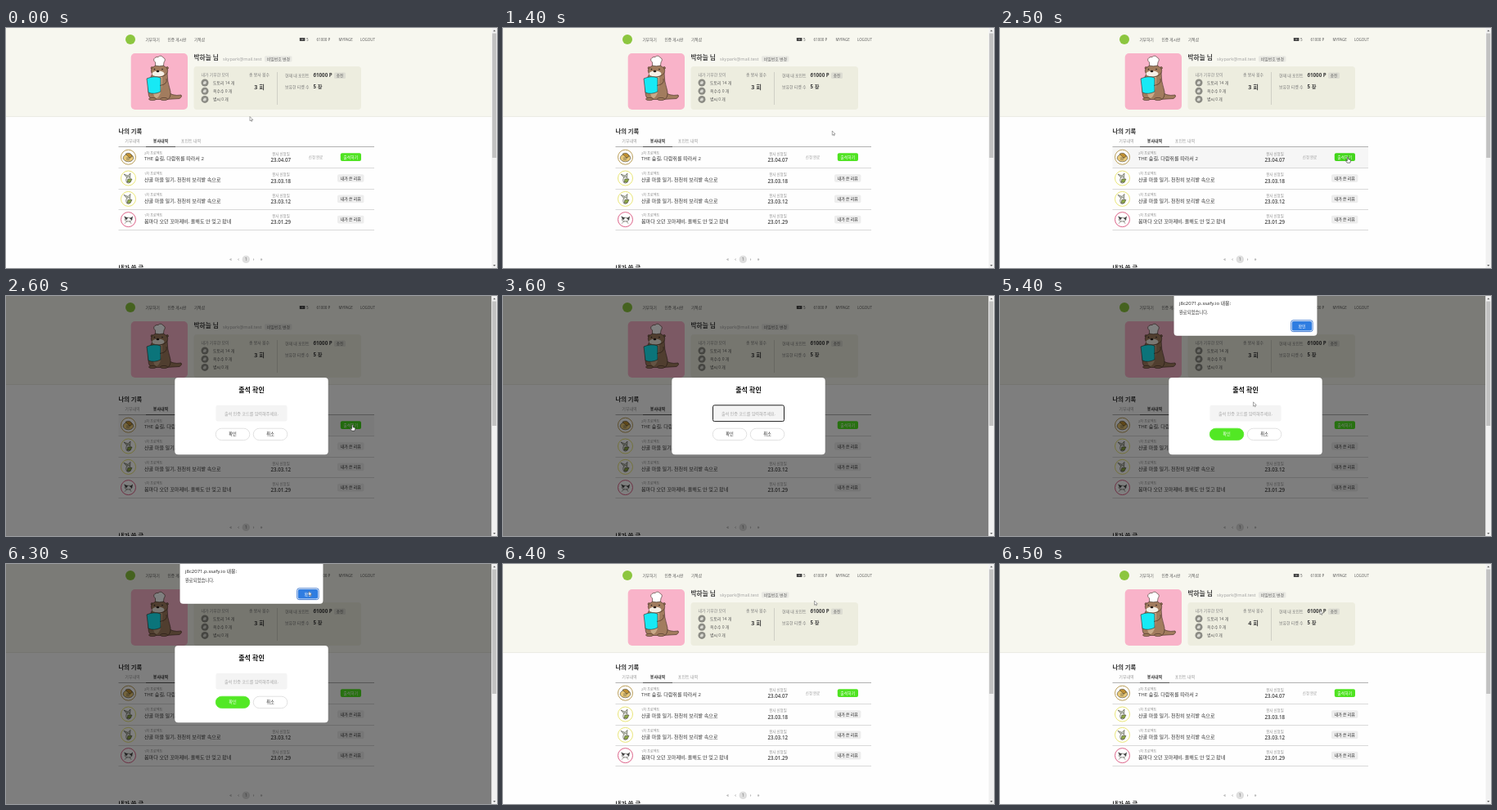
Animation of 600 by 294 pixels, one loop 6.6 s. Source, as an HTML page:

```html
<!DOCTYPE html>
<html>
<head>
<meta charset="utf-8">
<style>
html, body { margin: 0; width: 100%; height: 100%; overflow: hidden; background: #fefefe; }
svg { display: block; width: 600px; height: 294px; }
text { font-family: 'Open Sans', 'Noto Sans CJK KR', 'Noto Sans CJK', sans-serif; white-space: pre; }
</style>
</head>
<body>
<svg id="stage" viewBox="0 0 600 294" xmlns="http://www.w3.org/2000/svg">
  <g id="page"></g>
  <g id="modal">
    <rect width="593.5" height="294" fill="#000" opacity=".5"/>
  </g>
  <g id="alert"></g>
  <g id="scrollbar"></g>
  <g id="pointer">
    <path id="arrow" d="M0 0V5.3L1.2 4.3L2 6L2.8 5.6L2.1 4H3.8Z" fill="#fff" stroke="#555" stroke-width=".5"/>
    <path id="hand" d="M-.7 .6Q0 -.5 .7 .6V3L3 3.5Q3.7 3.8 3.5 5L2.8 7.3H-.8L-2.6 4.9Q-2.5 3.8 -.7 5Z" fill="#fff" stroke="#222" stroke-width=".6"/>
    <path id="beam" d="M-1 -1H1M0 -1V5M-1 5H1" fill="none" stroke="#333" stroke-width=".6"/>
  </g>
</svg>
<script>
const $ = id => document.getElementById(id);
let layer = $('page');

function add(tag, attrs, content) {
  const el = document.createElementNS('http://www.w3.org/2000/svg', tag);
  for (const key in attrs) el.setAttribute(key, attrs[key]);
  if (content !== undefined) el.textContent = content;
  return layer.appendChild(el);
}
const text = (s, x, y, size, fill = '#555', weight = 400, anchor = 'start') =>
  add('text', { x, y, 'font-size': size, fill, 'font-weight': weight, 'text-anchor': anchor }, s);
const mid = (s, x, y, size, fill, weight) => text(s, x, y, size, fill, weight, 'middle');
const box = (x, y, width, height, fill, rx = 0, more = {}) =>
  add('rect', { x, y, width, height, fill, rx, ...more });
const dot = (cx, cy, r, fill, more = {}) => add('circle', { cx, cy, r, fill, ...more });
const oval = (cx, cy, rx, ry, fill, more = {}) => add('ellipse', { cx, cy, rx, ry, fill, ...more });
const path = (d, fill, more = {}) => add('path', { d, fill, ...more });
const show = (el, on) => el.setAttribute('display', on ? 'inline' : 'none');

// Header
box(0, 0, 593.5, 108.5, '#f7f7ef');
box(0, 108, 593.5, 1, '#ecece4');
dot(152, 14, 6, '#8cc63f');
text('기부하기', 170.5, 15.8, 4.7);
text('인증 게시판', 197.5, 15.8, 4.7);
text('기적샵', 230, 15.8, 4.7);
box(358.8, 12, 6.6, 4, '#444', .4);
box(361, 13, 2.2, 2, '#777');
text('5', 367, 15.6, 4.5);
text('61000 P', 379.5, 15.6, 4.5);
text('MYPAGE', 406.5, 15.6, 4.4);
text('LOGOUT', 433, 15.6, 4.4);

function otter() {
  const line = { stroke: '#3d2a20', 'stroke-width': .6 };
  const fur = '#a27c5e';
  box(152.7, 31, 69.3, 69, '#f9b3c9', 5);
  path('M196 77Q203 84 214 82Q216 84 212 86.5L195 87.5Z', fur, line);
  path('M179 56Q173 66 174 79Q174 87 180 87.5H198Q203 83 200 74Q197 66 197 54Z', fur, line);
  path('M181 60Q177 84 184 86Q191 83 191 60Z', '#c9a988');
  oval(179, 87, 4.5, 1.6, fur, line);
  oval(193, 87, 4.5, 1.6, fur, line);
  dot(178.5, 49, 1.4, fur, line);
  dot(197, 49, 1.4, fur, line);
  oval(187.5, 52.5, 10.2, 7.2, fur, line);
  oval(186, 56, 7.5, 3.6, '#f5efe6');
  oval(185.5, 53, 1.9, 1.2, '#2c211d');
  dot(181.5, 50.5, .8, '#222');
  dot(191, 50.5, .8, '#222');
  path('M182.5 46V42Q179 39 182 36.5Q184 35 186 35.5Q189 32.5 192 36Q196 38 193 42L192.5 46Q187 47.5 182.5 46Z', '#fff', line);
  path('M172 62Q181 58 189 61L189 78Q181 82 174 79Z', '#17e9f5', line);
  path('M196 62Q198 69 188 70.5', 'none', line);
}
otter();

text('박하늘 님', 229.5, 39.4, 7.7, '#3c3c3c', 700);
text('skypark@mail.test', 265, 39.6, 5.6, '#a0a0a0');
box(316, 34.2, 33.5, 7.4, '#e9e9e3', 1.5);
mid('비밀번호 변경', 332.8, 39.8, 4.9, '#666');

// Summary panel
box(229.5, 47, 204.5, 53, '#ededdf', 4);
text('내가 기부한 모이', 238.5, 59, 4.9, '#858585');
text('총 봉사 횟수', 297, 59, 4.9, '#777');
['도토리 14 개', '옥수수 0 개', '볍씨 0 개'].forEach((label, i) => {
  const y = 67 + i * 10.2;
  dot(243, y, 4.5, '#8b8b84');
  path(`M240.8 ${y + 1.8}Q240.5 ${y - 2} 244 ${y - 2}Q246 ${y} 243.5 ${y + 2}Z`, '#d9d9d2');
  text(label, 253, y + 1.9, 4.9);
});
const visits = mid('3 회', 309.5, 74.6, 7.2, '#3c3c3c', 700);
box(331, 54, .8, 40, '#c9c9c0');
text('현재 내 포인트', 341, 60, 4.9, '#777');
text('61000 P', 375.5, 60.4, 6.2, '#3c3c3c', 700);
box(401, 54.5, 14, 7.6, '#dcdcd2', 1.5);
mid('충전', 408, 60.1, 4.7, '#666');
text('보유한 티켓 수', 341, 74, 4.9, '#777');
text('5 장', 375.5, 74.3, 6.2, '#3c3c3c', 700);

// Record list
text('나의 기록', 137.5, 129, 7.3, '#2c2c2c', 700);
mid('기부내역', 154.5, 140.3, 5, '#999');
mid('봉사내역', 189, 140.3, 5, '#333', 700);
mid('포인트 내역', 226, 140.3, 5, '#999');
const rowTint = box(137.5, 146, 312.5, 25, '#f6f6f6');
box(137.5, 145, 312.5, 1, '#b0b0b0');
box(171, 145, 36, 1, '#555');

function avatar(y, ring, kind) {
  const line = { stroke: '#4a4a40', 'stroke-width': .6 };
  dot(149.5, y, 9, '#fff', { stroke: ring, 'stroke-width': .9 });
  if (kind === 'squirrel') {
    oval(149.5, y + 1, 6.3, 4.6, '#e8c877', line);
    path(`M146 ${y - 4}Q152 ${y - 7} 154.5 ${y - 1}L151 ${y + 1}Z`, '#c09032', line);
    path(`M147 ${y + 1}H152M147 ${y + 3}H151`, 'none', line);
  } else if (kind === 'rabbit') {
    path(`M147.5 ${y - 1}L144 ${y - 5}L149 ${y - 3}L152 ${y - 6}L151.5 ${y}Z`, '#c9cfc0', line);
    oval(149.5, y + 2.2, 2.8, 4, '#eef0e8', line);
    path(`M149 ${y + 1}L154 ${y + 1}L152 ${y + 5}L148 ${y + 5}Z`, '#8faa45', line);
  } else {
    oval(149.5, y, 4.2, 2.4, '#f5f5f5', line);
    path(`M144 ${y - 4}L149 ${y - 2}L147 ${y + 1}ZM151 ${y - 1}L155 ${y - 4}L154 ${y + 1}Z`, '#444');
    path(`M148 ${y + 2}L145 ${y + 5}M151 ${y + 2}L153 ${y + 5}`, 'none', line);
  }
}

const rows = [
  [158.2, '2차', 'THE 숲길, 다람쥐를 따라서 2', '23.04.07', '#b39344', 'squirrel'],
  [184, '1차', '산골 마을 일기, 천천히 보리밭 속으로', '23.03.18', '#e6e268', 'rabbit'],
  [209.4, '1차', '산골 마을 일기, 천천히 보리밭 속으로', '23.03.12', '#e6e268', 'rabbit'],
  [234.6, '1차', '봄마다 오던 꼬마제비, 올해도 안 잊고 왔네', '23.01.29', '#d9527c', 'bird']
];
let attend;
rows.forEach(([y, round, title, date, ring, kind], i) => {
  avatar(y, ring, kind);
  text(round + ' 프로젝트', 169, y - 3.6, 4.1, '#888');
  text(title, 169, y + 4.2, 6.1, '#333');
  mid('봉사 신청일', 336, y - 2.7, 4.4, '#8c8c8c');
  mid(date, 335.7, y + 5.6, 6.2, '#444', 600);
  box(137.5, Math.floor(y + 13), 312.5, 1, '#d9d9d9');
  if (i) {
    box(405, y - 4.8, 32.5, 9.6, '#ededed', 2);
    mid('내가 쓴 리뷰', 421.3, y + 1.8, 4.9, '#222');
  } else {
    mid('신청 완료', 378.5, y + 2, 4.4, '#999');
    attend = box(408.8, y - 4.9, 25.2, 9.7, '#4fe321', 2);
    mid('출석하기', 421.3, y + 1.8, 4.9, '#fff');
  }
});

dot(293.3, 283.4, 4.7, '#dedede');
[['«', 274.5], ['‹', 284], ['1', 293.3], ['›', 302.7], ['»', 312]].forEach(([s, x]) => mid(s, x, 285.4, 5.5, '#666'));
text('내가 쓴 글', 137.5, 295.6, 7.3, '#2c2c2c', 700);

// Attendance dialog
layer = $('modal');
box(206.3, 100, 187.4, 94.2, '#fff', 4);
mid('출석 확인', 300, 118.3, 8, '#111', 700);
const field = box(256.5, 133.8, 87, 19.8, '#f4f4f4', 2);
const hint = mid('출석 인증 코드를 입력해주세요.', 300, 145.7, 5.1, '#a5a5a5');
const code = mid('', 300, 145.7, 5.1, '#333');
const caret = box(300, 140, .6, 7, '#222');
const confirm = box(256.3, 162.2, 41.5, 14.4, '#fff', 7.2, { 'stroke-width': .7 });
const confirmLabel = mid('확인', 277, 171.3, 5.2);
box(302.3, 162.2, 41.5, 14.4, '#fff', 7.2, { stroke: '#d5d5d5', 'stroke-width': .7 });
mid('취소', 323, 171.3, 5.2, '#222');

// Browser message
layer = $('alert');
box(211.8, -5, 176.4, 54.5, '#000', 5, { opacity: .12 });
box(212.5, -6, 175, 54.7, '#fff', 4);
text('j8c2071.p.ssafy.io 내용:', 219, 11, 6, '#222');
text('완료되었습니다.', 219, 22.2, 5.3, '#333');
box(355.7, 29.8, 26.4, 13.8, '#fff', 2.5, { stroke: '#1b5fc4', 'stroke-width': .8 });
box(356.8, 30.9, 24.2, 11.6, '#2f7de1', 1.8);
mid('확인', 369, 38.6, 5, '#fff');

layer = $('scrollbar');
box(593.5, 0, 6.5, 294, '#f1f1f1');
box(594.2, 6.5, 5, 152.5, '#c1c1c1');
path('M595.2 4.2L596.8 2.2L598.4 4.2ZM595.2 290L596.8 292L598.4 290Z', '#666');

// Pointer stops: time, x, y
const stops = [
  [0, 298, 108.5], [100, 298, 108.5], [700, 381, 122.8], [900, 381, 122.8], [1000, 402.3, 126],
  [1500, 402.3, 126], [2100, 425, 157.8], [2500, 425, 157.8], [2600, 423.3, 157.8],
  [3100, 304, 141], [4300, 304, 141], [4700, 285.3, 168.3], [5200, 285.3, 168.3],
  [5900, 370, 33.5], [6300, 370, 33.5], [6500, 391, 56.5], [6600, 391, 56.5]
];
const keyTimes = [3900, 4100, 4200, 4300, 4400, 4500];
const LOOP = 6600, TICK = 100;

function pointerAt(t) {
  const i = stops.findIndex(s => s[0] > t);
  const [t0, x0, y0] = stops[i - 1], [t1, x1, y1] = stops[i];
  const k = (t - t0) / (t1 - t0);
  return [x0 + (x1 - x0) * k, y0 + (y1 - y0) * k];
}

function draw(t) {
  const [x, y] = pointerAt(t);
  const within = (l, top, r, b) => x >= l && x <= r && y >= top && y <= b;
  const modal = t >= 2600 && t < 6400;
  const message = t >= 5100 && t < 6400;
  const focused = t >= 3200 && t < 5100;
  const overAttend = within(408, 153, 434, 163.5) && t < 2700;
  const overRow = within(137, 146, 450, 171) && t < 2700;
  const overConfirm = modal && t >= 4600;
  const typed = message ? '' : '902938'.slice(0, keyTimes.filter(k => k <= t).length);

  show($('modal'), modal);
  show($('alert'), message);
  show(rowTint, overRow);
  attend.setAttribute('fill', overAttend ? '#43d61b' : '#4fe321');
  visits.textContent = t >= 6500 ? '4 회' : '3 회';

  field.setAttribute('stroke', focused ? '#222' : 'none');
  show(hint, !typed);
  code.textContent = typed;
  caret.setAttribute('x', 300 + typed.length * 1.46);
  show(caret, focused && !(t >= 3600 && t < 3900) && t < 4900);
  confirm.setAttribute('fill', overConfirm ? '#52e824' : '#fff');
  confirm.setAttribute('stroke', overConfirm ? '#52e824' : '#d5d5d5');
  confirmLabel.setAttribute('fill', overConfirm ? '#fff' : '#222');

  const overField = modal && within(256, 133, 344, 154) && !message;
  const hand = overAttend || (overConfirm && !message && y > 162);
  show($('beam'), overField && (t < 3600 || t >= 4400));
  show($('hand'), hand);
  show($('arrow'), !hand && !overField);
  $('pointer').setAttribute('transform', `translate(${x} ${y})`);
}

const start = performance.now();
function frame() {
  const t = (performance.now() - start) % LOOP;
  draw(Math.floor(t / TICK) * TICK);
  requestAnimationFrame(frame);
}
frame();
</script>
</body>
</html>
```
